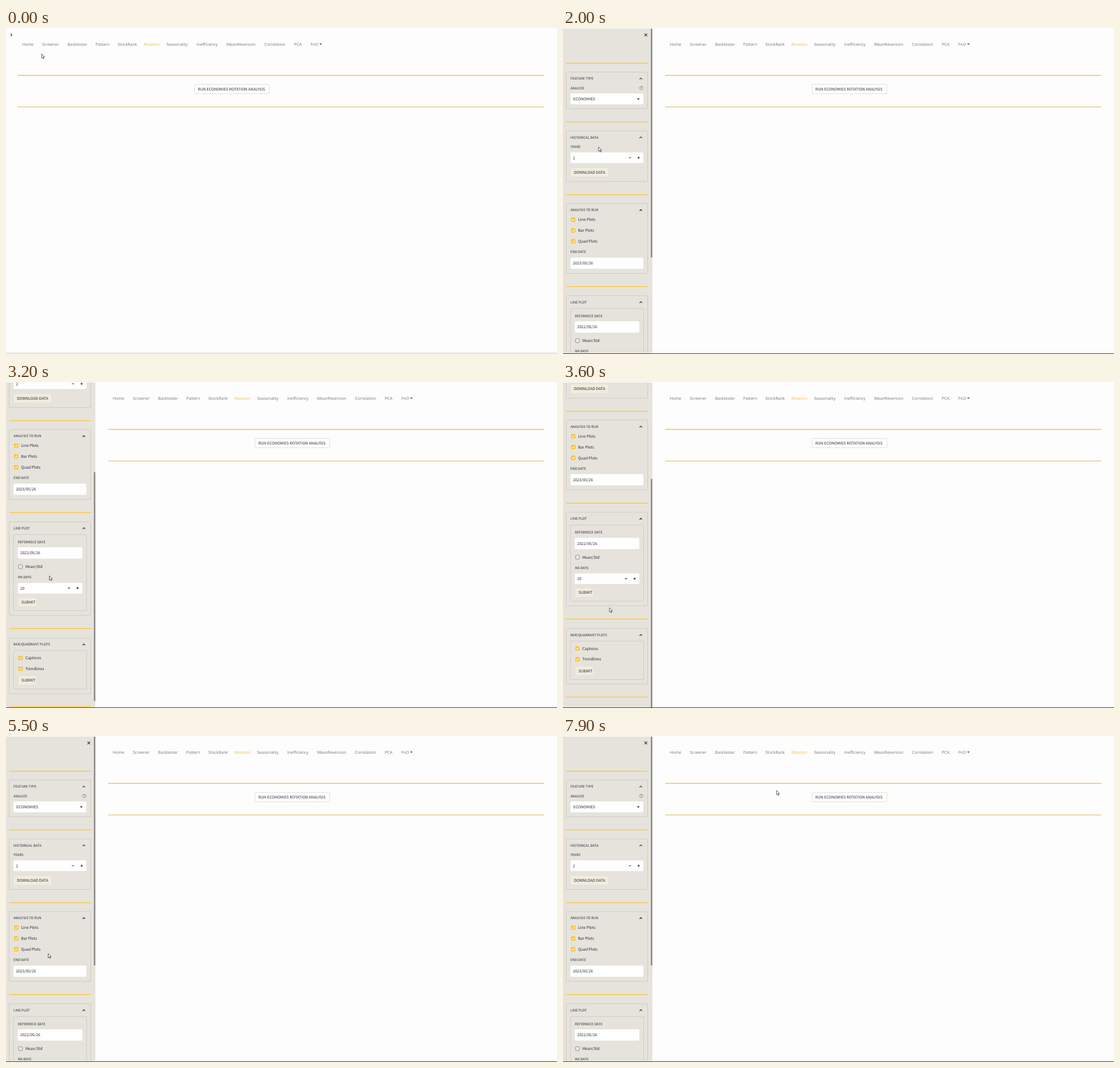
Animation, 960 px wide and 568 px high, one loop 8000 ms. Source, as an HTML page:

```html
<!DOCTYPE html>
<html lang="en">
<head>
<meta charset="utf-8">
<title>Rotation analysis</title>
<style>
  html, body { margin: 0; width: 100%; height: 100%; overflow: hidden; background: #fdfdfd; }
  svg { display: block; width: 960px; height: 568px; }
  text { text-rendering: geometricPrecision; white-space: pre; }
  .ui { font-family: "Noto Sans CJK JP", "Noto Sans CJK SC", "Noto Sans", sans-serif; fill: #2b2d38; }
  .nav { font: 7.05px "Open Sans", "Noto Sans", sans-serif; fill: #74747c; }
  .nav.active { fill: #f7bd2a; }
  .panel { fill: none; stroke: #c9c6bf; stroke-width: .8; }
  .field { fill: #fefefe; }
  .button { fill: #f0ecdf; stroke: #e2dccb; stroke-width: .6; }
  .icon { fill: none; stroke: #2b2d38; stroke-width: 1.1; }
  .hover .button { stroke: #f8c33a; }
  .hover text { fill: #f0b72a; }
</style>
</head>
<body>
<svg viewBox="0 0 960 568">
  <rect width="960" height="568" fill="#fdfdfd"/>
  <g id="main"></g>
  <g id="sidebar">
    <rect y="1" width="155.7" height="566" fill="#e6e3dc"/>
    <g id="content"></g>
    <rect id="thumb" x="153" width="2.6" height="399" rx="1" fill="#8b8b8a"/>
  </g>
  <rect width="960" height="1" fill="#fdfdfd"/>
  <rect id="edge" width="960"/>
  <path id="cursor" d="M0 0V7.4L1.8 5.8L3 8.5L4.2 8L3 5.3H5.4Z" fill="#fff" stroke="#33333a" stroke-width=".8" stroke-linejoin="round"/>
</svg>
<script>
const $ = id => document.getElementById(id);

// Static parts; y is the vertical centre of each text line.
const text = (x, y, s, size = 6.7, weight = 400) =>
  `<text class="ui" x="${x}" y="${y + size * .367}" font-size="${size}" font-weight="${weight}">${s}</text>`;
const label = (x, y, s) => text(x, y, s, 5.9);
const box = (cls, x, y, w, h, r = 1.5) =>
  `<rect class="${cls}" x="${x}" y="${y}" width="${w}" height="${h}" rx="${r}"/>`;
const icon = d => `<path class="icon" d="${d}"/>`;
const rule = (y, x = 5.5, w = 142.5) =>
  `<rect x="${x}" y="${y - .65}" width="${w}" height="1.3" fill="#f8c53c"/>`;
const panel = (y, bottom, title) =>
  box('panel', 5.5, y, 142, bottom - y) + label(13, y + 11.2, title) +
  icon(`M133.4 ${y + 12.6}l2.2 -2.2l2.2 2.2`);
const inner = (y, bottom) => box('panel', 13, y, 127.5, bottom - y);
const field = (x, y, w, h, value) =>
  box('field', x, y, w, h, 2) + text(x + 4.2, y + h / 2, value);
const stepper = (x, y, w, value) =>
  field(x, y, w, 18.5, value) +
  icon(`M${x + w - 25.3} ${y + 9.2}h4M${x + w - 10.2} ${y + 9.2}h4m-2 -2v4`);
const button = (x, y, w, s, id = '') =>
  `<g id="${id}">${box('button', x, y, w, 16.5)}${text(x + 5.7, y + 8.3, s)}</g>`;
const check = (x, y, s, on = true) =>
  (on
    ? `<rect x="${x}" y="${y - 3.8}" width="7.6" height="7.6" rx="1.6" fill="#f9c338"/>` +
      `<path d="M${x + 1.8} ${y}l1.5 1.5l2.7 -2.9" fill="none" stroke="#fff" stroke-width="1.1"/>`
    : `<rect x="${x + .4}" y="${y - 3.4}" width="6.8" height="6.8" rx="1.5" fill="#eceae4" stroke="#77767a" stroke-width=".8"/>`) +
  text(x + 12.2, y, s);

$('content').innerHTML = [
  icon('M141.9 9.6l4.8 4.8m0 -4.8l-4.8 4.8'),
  ...[61.4, 163.5, 290.5, 450.5, 652.5, 788.5].map(y => rule(y)),

  panel(76.8, 140.5, 'FEATURE TYPE'),
  label(13, 104.5, 'ANALYZE'),
  '<circle cx="136.4" cy="104.5" r="3" fill="none" stroke="#77767a" stroke-width=".7"/>',
  '<text class="ui" x="136.4" y="106.3" font-size="4.6" text-anchor="middle">?</text>',
  box('field', 13, 114, 127, 19, 2), text(18, 123.6, 'ECONOMIES'),
  '<path d="M128.8 122.5h4.8l-2.4 2.7z" fill="#2b2d38"/>',

  panel(179.3, 267.5, 'HISTORICAL DATA'),
  label(13, 207.2, 'YEARS'),
  stepper(13, 216.8, 127, '2'),
  button(13.2, 243.2, 66.3, 'DOWNLOAD DATA', 'download'),

  panel(306, 427.5, 'ANALYSIS TO RUN'),
  check(14, 334, 'Line Plots'), check(14, 352.8, 'Bar Plots'), check(14, 371.6, 'Quad Plots'),
  label(13, 390.2, 'END DATE'),
  field(13, 400, 127, 19.5, '2023/05/26'),

  panel(466.5, 629.5, 'LINE PLOT'),
  inner(488.8, 621.5),
  label(20.7, 501.5, 'REFERNECE DATE'),
  field(20.5, 511, 112.5, 19.8, '2022/05/26'),
  check(21.5, 544.7, 'Mean/Std', false),
  label(20.7, 563.3, 'MA DAYS'),
  stepper(20.5, 572.9, 112.5, '20'),
  button(21, 598.2, 32, 'SUBMIT'),

  panel(669, 766, 'BAR/QUADRANT PLOTS'),
  inner(691, 758),
  check(21.5, 703.7, 'Captions'), check(21.5, 722.5, 'Trendlines'),
  button(21, 734.5, 32, 'SUBMIT')
].join('');

const links = [
  [28, 'Home'], [63, 'Screener'], [107, 'Backtester'], [156, 'Pattern'],
  [194.5, 'StockRank'], [240, 'Rotation'], [279.5, 'Seasonality'], [332, 'Inefficiency'],
  [384, 'MeanReversion'], [450, 'Correlation'], [502, 'PCA'], [530.7, 'FnO']
];
$('main').innerHTML = '<g id="links">' +
  links.map(([x, s]) => `<text class="nav${s === 'Rotation' ? ' active' : ''}" x="${x}" y="31">${s}</text>`).join('') +
  '<path d="M546 27h4.6l-2.3 2.5z" fill="#55555c"/></g>' +
  `<g id="expand">${icon('M8 9.6l2.3 2.3l-2.3 2.3')}</g>` +
  '<rect id="ruleTop" y="81.8" height="1.5" fill="#f7c437"/>' +
  '<rect id="ruleLow" y="137" height="1.2" fill="#d9c473"/>' +
  `<g id="run"><rect x=".5" y="98.3" width="130.3" height="16.2" rx="1.5" fill="#fefefe" stroke="#e0dccb" stroke-width=".9"/>` +
  text(6.3, 106.5, 'RUN ECONOMIES ROTATION ANALYSIS', 6.63) + '</g>';

// Tracks: [time, values...], linear between keys.
const pointer = [
  [0, 62, 45], [100, 62, 45], [700, 8, 10], [1200, 8, 10], [1800, 51, 151], [2000, 62, 207.5],
  [2100, 62, 207.5], [2800, 70, 282], [3600, 81, 393.5], [4000, 78, 434], [4100, 78, 434],
  [4900, 72, 406.5], [5500, 73.5, 379], [5900, 73, 251], [6600, 103, 124],
  [7100, 103, 124], [7900, 372, 95]
];
const scroll = [[2100, 0], [2800, 157], [3300, 239.5], [4100, 239.5], [4900, 122], [5400, 0]];
const opening = [[900, 0], [1300, 1]];

function at(track, t) {
  const i = track.findIndex(k => k[0] > t);
  if (i === 0) return track[0].slice(1);
  if (i < 0) return track[track.length - 1].slice(1);
  const a = track[i - 1], b = track[i], u = (t - a[0]) / (b[0] - a[0]);
  return a.slice(1).map((v, j) => v + (b[j + 1] - v) * u);
}
const move = (id, x, y) => $(id).setAttribute('transform', `translate(${x} ${y})`);
const set = (id, attrs) => {
  for (const k in attrs) $(id).setAttribute(k, attrs[k]);
};

function draw(t) {
  const p = 1 - (1 - at(opening, t)[0]) ** 3;
  const left = 20 + 158 * p;
  const [y] = at(scroll, t);
  const [cx, cy] = at(pointer, t);

  move('sidebar', -156 * (1 - p), 0);
  move('content', 0, -y);
  set('thumb', { y: 1 + y * .7 });
  move('links', left - 20, 0);
  move('run', 328 + 105.5 * p, 0);
  for (const id of ['ruleTop', 'ruleLow']) set(id, { x: left, width: 938 - left });
  $('expand').style.display = p > 0 ? 'none' : '';

  const over = y === 0 && p === 1 && cx > 13 && cx < 79.5 && cy > 243 && cy < 260;
  $('download').classList.toggle('hover', over);

  set('edge', t < 100
    ? { y: 565.5, height: 2.5, fill: '#e3e3e3' }
    : { y: 567, height: 1, fill: '#3c3c3c' });
  move('cursor', cx, cy);
}

function tick() {
  draw(Math.floor(performance.now() % 8000 / 100) * 100);
  requestAnimationFrame(tick);
}
tick();
</script>
</body>
</html>
```
